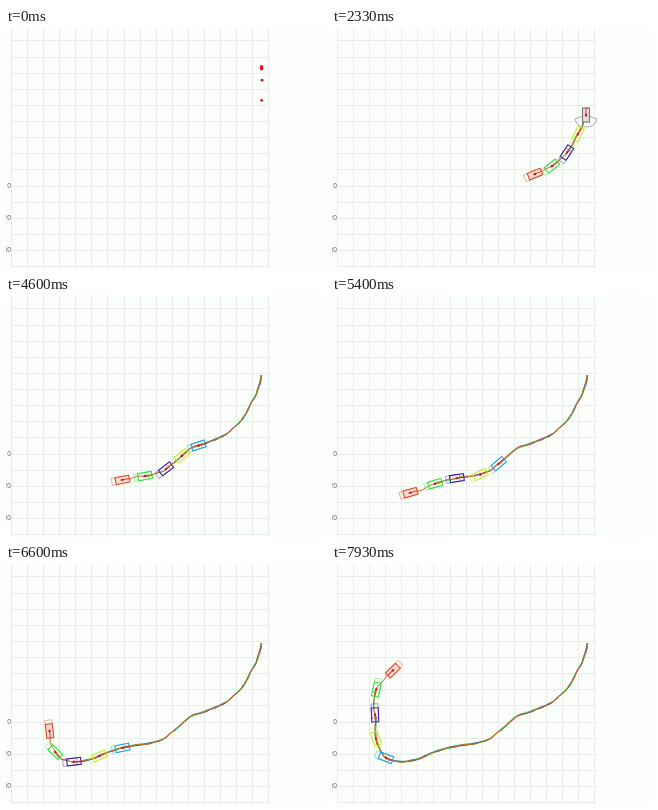
Recreate the animation shown at these times as an HTML page with a canvas. Size 320 px wide and 240 px high, loop 8000 ms.

```html
<!DOCTYPE html>
<html lang="en">
<head>
<meta charset="utf-8">
<title>Convoy path</title>
<style>
html, body { margin: 0; width: 100%; height: 100%; overflow: hidden; background: #fcfefc; }
canvas { display: block; width: 320px; height: 240px; }
</style>
</head>
<body>
<canvas id="stage" width="320" height="240"></canvas>
<script>
const ctx = document.getElementById('stage').getContext('2d');
const LOOP = 8000, HEADWAY = 500, SPAWN = 150, ACTIVE = 500;
const RED = '#d01420';

// Key points of the lead route, one per HEADWAY; followers repeat it with that delay.
const ROUTE_START = -1170;
const route = [
  [255.5, 39], [256, 47], [256, 65], [254, 87], [246, 106], [235, 124.5],
  [220, 138], [203, 146], [184, 153], [169, 166], [151.5, 177.5], [128, 181.5],
  [106.5, 186.5], [82, 196], [57.5, 196], [45, 179], [43.5, 156],
  [42.5, 130], [57, 110], [76, 96]
];
const colors = ['#dc4c28', '#2fe03a', '#3a1ca8', '#c6f02c', '#22a4dc'];

// Catmull-Rom spline through the key points
function place(t) {
  const last = route.length - 1;
  const pos = Math.max(0, Math.min(last, (t - ROUTE_START) / HEADWAY));
  const i = Math.min(last - 1, Math.floor(pos)), u = pos - i;
  const key = n => route[Math.max(0, Math.min(last, n))];
  const [x, y] = [0, 1].map(k => {
    const [a, b, c, d] = [i - 1, i, i + 1, i + 2].map(n => key(n)[k]);
    return b + u / 2 * (c - a + u * (2 * a - 5 * b + 4 * c - d + u * (3 * (b - c) + d - a)));
  });
  return { x, y };
}

// The body turns a little after the path does.
function heading(t) {
  const a = place(t - 260), b = place(t);
  return Math.atan2(b.y - a.y, b.x - a.x);
}

function line(x1, y1, x2, y2) {
  ctx.beginPath();
  ctx.moveTo(x1, y1);
  ctx.lineTo(x2, y2);
  ctx.stroke();
}

function dot(p, r) {
  ctx.fillStyle = RED;
  ctx.beginPath();
  ctx.arc(p.x, p.y, r, 0, Math.PI * 2);
  ctx.fill();
}

function drawGrid() {
  ctx.fillStyle = '#fcfefc';
  ctx.fillRect(0, 0, 320, 240);
  ctx.strokeStyle = '#e9ede9';
  ctx.lineWidth = 1;
  for (let i = 0; i < 17; i++) {
    const x = Math.round(5 + i * 16.08) + 0.5;
    line(x, 0, x, 240);
  }
  for (let i = 0; i < 15; i++) {
    const y = Math.round(12.4 + i * 16.13) + 0.5;
    line(5, y, 264, y);
  }
  ctx.fillStyle = '#555';
  ctx.font = '6.5px "Open Sans", sans-serif';
  ctx.textAlign = 'right';
  ctx.textBaseline = 'middle';
  [10, 20, 30].forEach((n, i) => ctx.fillText(n, 5, 158 + i * 32.2));
}

function drawTrail(i, end) {
  if (end <= SPAWN) return;
  ctx.strokeStyle = colors[i];
  ctx.lineWidth = 1;
  ctx.beginPath();
  for (let t = SPAWN; t < end + 20; t += 20) {
    const now = Math.min(t, end), p = place(now), h = heading(now);
    const sway = 0.55 * Math.sin(now / (60 + 17 * i) + i * 1.9);
    ctx.lineTo(p.x - Math.sin(h) * sway, p.y + Math.cos(h) * sway);
  }
  ctx.stroke();
}

function drawFan() {
  ctx.lineWidth = 0.8;
  ctx.strokeStyle = '#999';
  ctx.beginPath();
  ctx.moveTo(0, 0);
  ctx.lineTo(4, 11);
  ctx.quadraticCurveTo(9, 10, 11, 6);
  ctx.quadraticCurveTo(13, 0, 11, -6);
  ctx.quadraticCurveTo(9, -10, 4, -11);
  ctx.closePath();
  ctx.stroke();
}

function drawCar(i, t) {
  const p = place(t);
  if (t < SPAWN) {
    dot(p, t < -950 ? 1.7 : 1.4);
    return;
  }
  const fresh = t < ACTIVE;
  ctx.save();
  ctx.translate(p.x, p.y);
  ctx.rotate(fresh ? Math.PI / 2 : heading(t));
  ctx.strokeStyle = colors[i];
  if (fresh) {
    drawFan();
    ctx.strokeStyle = '#777';
  } else {
    ctx.globalAlpha = 0.5;
    ctx.lineWidth = 0.8;
    ctx.strokeRect(-3, -3.5, 14, 7);
    ctx.globalAlpha = 1;
  }
  if (fresh || i === 0) {
    ctx.fillStyle = fresh ? '#dedede' : '#fbdcd2';
    ctx.fillRect(-7, -3.5, 14, 7);
  }
  ctx.lineWidth = 1.1;
  ctx.strokeRect(-7, -3.5, 14, 7);
  ctx.strokeStyle = '#d8401c';
  ctx.lineWidth = 1;
  line(-7, 0, 2, 0);
  ctx.restore();
  dot(p, 1.2);
}

function draw(now) {
  const t = now % LOOP;
  drawGrid();
  for (const part of [drawTrail, drawCar]) {
    for (let i = colors.length - 1; i >= 0; i--) part(i, t - i * HEADWAY);
  }
}

const start = performance.now();
function tick() {
  draw(performance.now() - start);
  requestAnimationFrame(tick);
}
tick();
</script>
</body>
</html>
```
